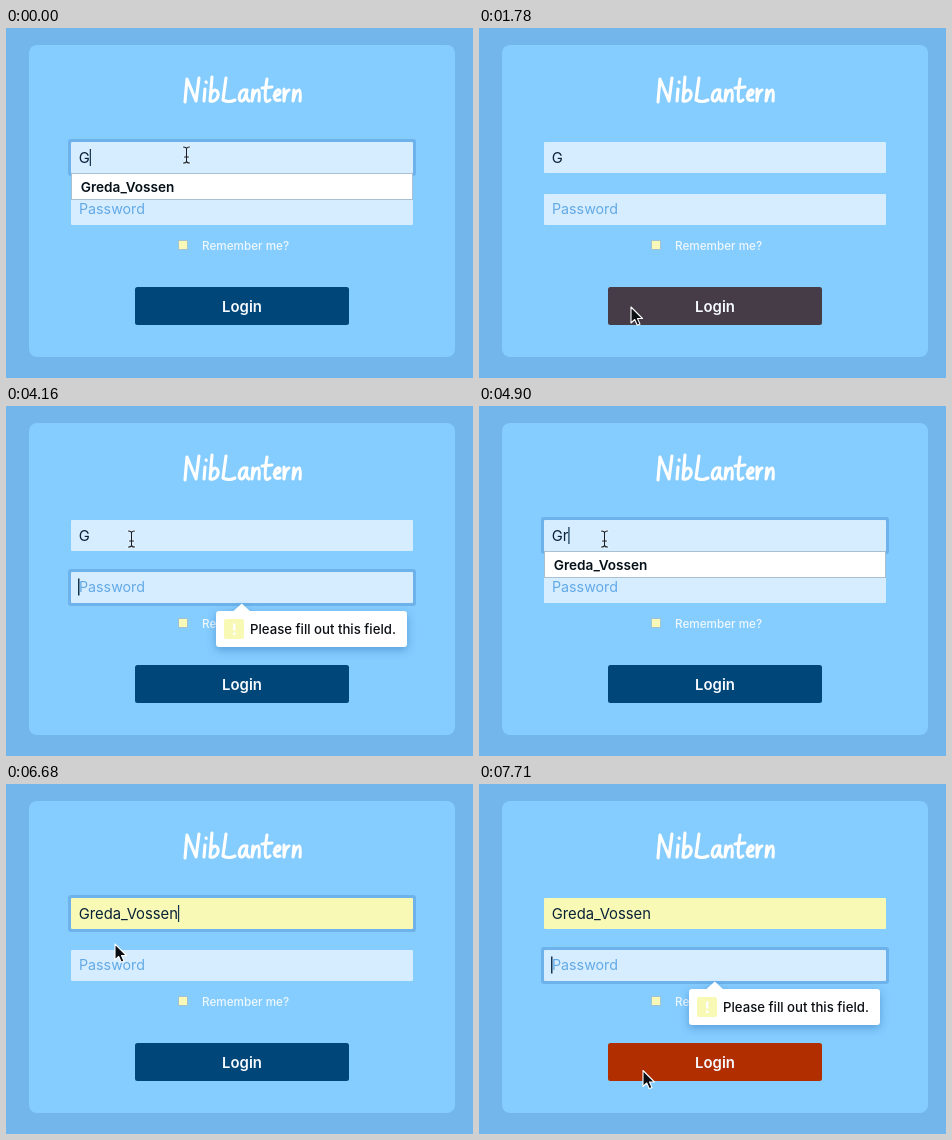
Write an HTML page that moves like this. It is 467x350 px and loops after 8 s.

```html
<!DOCTYPE html>
<html lang="en">
<head>
<meta charset="utf-8">
<title>Login form</title>
<style>
  html, body { margin: 0; width: 100%; height: 100%; overflow: hidden; background: #73b6ec; }
  svg { display: block; width: 100%; height: 100%; }
  text { font-family: Inter, Roboto, sans-serif; white-space: pre; }
  .field { fill: #d6edff; }
  .ring { fill: #6db2ea; }
  .entry { font-size: 14.8px; fill: #0a2238; }
  .hint { font-size: 14.25px; fill: #62a9e6; }
  .caret { fill: #12334f; }
  .tip { filter: drop-shadow(0 3px 4px rgba(20, 90, 160, .4)); }
</style>
</head>
<body>
<svg viewBox="0 0 467 350" preserveAspectRatio="none">
  <rect width="467" height="350" fill="#73b6ec"/>
  <rect x="23" y="17" width="426" height="312" rx="8" fill="#85ccff"/>

  <g role="img" aria-label="NibLantern" fill="none" stroke="#fff" stroke-width="3.1" stroke-linecap="round" stroke-linejoin="round">
    <path d="M179 74L181 51L190 73L193 50"/>
    <path d="M199 61L198 73M200 54L200.3 54.4"/>
    <path d="M206 49L204 73C212 75 215 63 209 62C207 62 205 65 204.5 68"/>
    <path d="M220 50L217 72Q223 75 229 72"/>
    <path d="M240 62C233 60 231 74 236 73C239 72 240 67 241 62Q239 71 243 73"/>
    <path d="M247 62L246 73Q248 62 252 62Q254 63 253 73"/>
    <path d="M261 51Q258 70 260 73Q262 74 264 72M256 60L266 59"/>
    <path d="M268 68Q275 67 274 63Q272 60 269 65Q267 74 274 72"/>
    <path d="M278 61L278 73Q279 63 283 62"/>
    <path d="M288 62L287 73Q290 62 293 62Q295 63 294 73"/>
  </g>

  <rect id="userRing" class="ring" x="62" y="111" width="348" height="37" rx="3"/>
  <rect id="userBox" x="65" y="114" width="342" height="31" rx="1"/>
  <rect id="mark" y="121" height="17" fill="#b0d3ea"/>
  <text id="user" class="entry" x="72.7" y="134.5"></text>
  <rect id="userCaret" class="caret" y="121" width="1.2" height="17"/>

  <rect id="passRing" class="ring" x="62" y="163" width="348" height="37" rx="3"/>
  <rect class="field" x="65" y="166" width="342" height="31" rx="1"/>
  <text class="hint" x="73" y="186">Password</text>
  <rect id="passCaret" class="caret" x="72" y="172.5" width="1.5" height="17"/>

  <rect x="172.5" y="212.5" width="9" height="9" fill="#f8f8b8" stroke="#a3c3d0"/>
  <text x="196" y="221.5" font-size="11.7" font-weight="500" fill="#eef8ff">Remember me?</text>

  <rect id="button" x="129" y="259" width="214" height="38" rx="2.5"/>
  <text x="236" y="284" font-size="14.9" font-weight="600" text-anchor="middle" fill="#f7fbff">Login</text>

  <g id="drop">
    <rect id="dropBox" x="65.5" y="145.5" width="341" height="26" stroke="#a9bfd2"/>
    <text x="74.8" y="164" font-size="13.6" font-weight="600" fill="#061018">Greda_Vossen</text>
  </g>

  <g id="tip" class="tip">
    <path d="M213 205H227.5L235.8 197.5L244 205H398a3 3 0 0 1 3 3V238a3 3 0 0 1-3 3H213a3 3 0 0 1-3-3V208a3 3 0 0 1 3-3Z" fill="#fff"/>
    <rect x="218" y="213" width="20" height="20" rx="2" fill="#f7f9b5"/>
    <path d="M227 217.5h2.5v7h-2.5zM227 226.5h2.5v2.5h-2.5z" fill="#fff"/>
    <text x="244" y="228" font-size="13.2" font-weight="500" fill="#0c0f14">Please fill out this field.</text>
  </g>

  <path id="arrow" d="M0 0V16L3.7 12.5L6.3 18.3L9 17.1L6.5 11.5H11.5Z" fill="#0b0f14" stroke="#fff" stroke-width="1.1" stroke-linejoin="round"/>
  <g id="beam" fill="none" stroke-linecap="round">
    <path d="M-3 -8Q0 -8 0 -6Q0 -8 3 -8M0 -6V6M-3 8Q0 8 0 6Q0 8 3 8M-2 2H2" stroke="#fff" stroke-opacity=".55" stroke-width="2.6"/>
    <path d="M-3 -8Q0 -8 0 -6Q0 -8 3 -8M0 -6V6M-3 8Q0 8 0 6Q0 8 3 8M-2 2H2" stroke="#14202b" stroke-width="1.1"/>
  </g>
</svg>

<script>
const LOOP = 8000;
const NAME = 'Greda_Vossen';
const LEFT = 72.7;
const $ = id => document.getElementById(id);
const arrow = (x, y) => ({ shape: 'arrow', x, y });
const beam = (x, y) => ({ shape: 'beam', x, y });

// Each step keeps the values before it and changes only what it lists.
const steps = [
  [0, { ...beam(180.5, 127), typed: 'G', focus: 'user', caret: 1, drop: 0, open: 1, filled: 0, marked: 0, tip: 0, heat: 0 }],
  [450, { open: 0 }],
  [740, beam(176.5, 139)],
  [890, arrow(169, 156)],
  [1040, beam(162.5, 187)],
  [1190, arrow(157, 217)],
  [1340, { ...arrow(155, 242), focus: '' }],
  [1640, { ...arrow(153, 270), heat: 0.04 }],
  [1780, { ...arrow(152, 279), heat: 0.4 }],
  [1930, { ...arrow(152, 281), heat: 0.85 }],
  [2080, { heat: 1 }],
  [2220, { focus: 'pass', tip: 1 }],
  [2670, { ...arrow(146, 161.5), caret: 0, heat: 0.65 }],
  [2820, { ...beam(137.5, 143), heat: 0.2 }],
  [2970, { ...beam(129.5, 136), heat: 0 }],
  [3120, { ...beam(126.5, 134), caret: 1 }],
  [3270, beam(125.5, 133)],
  [3710, { caret: 0 }],
  [4160, { caret: 1 }],
  [4300, { focus: 'user', tip: 0 }],
  [4750, { typed: 'Gr' }],
  [4900, { open: 1 }],
  [5340, beam(122.5, 136)],
  [5490, beam(118.5, 140)],
  [5640, { ...arrow(113, 147), drop: 1, filled: 1, marked: 1, typed: NAME, caret: 0 }],
  [5790, arrow(110, 152)],
  [5930, arrow(108, 154.5)],
  [6080, arrow(109, 160)],
  [6680, { open: 0, drop: 0, marked: 0, caret: 1 }],
  [6830, arrow(121, 192)],
  [6980, arrow(142, 238)],
  [7120, { ...arrow(156, 272), heat: 0.2 }],
  [7270, { ...arrow(161, 281.5), heat: 0.65 }],
  [7420, { ...arrow(163, 285), heat: 0.95 }],
  [7560, { ...arrow(164, 286.5), heat: 1 }],
  [7710, { focus: 'pass', tip: 1 }]
];

let last = {};
const states = steps.map(([at, change]) => last = { ...last, ...change, at });

const show = (id, on) => $(id).setAttribute('visibility', on ? 'visible' : 'hidden');
const set = (id, name, value) => $(id).setAttribute(name, value);

function heatColor(k) {
  const cold = [0, 70, 120], hot = [176, 46, 0];
  return `rgb(${cold.map((c, i) => Math.round(c + (hot[i] - c) * k))})`;
}

function draw(s) {
  const user = $('user');
  user.textContent = s.typed;
  const end = LEFT + user.getComputedTextLength();

  show('userRing', s.focus === 'user');
  show('passRing', s.focus === 'pass');
  show('userCaret', s.focus === 'user' && s.caret);
  show('passCaret', s.focus === 'pass' && s.caret);
  set('userCaret', 'x', end);
  set('userBox', 'fill', s.filled ? '#f7f9b5' : '#d6edff');

  show('mark', s.marked);
  if (s.marked) {
    const from = LEFT + user.getSubStringLength(0, 2);
    set('mark', 'x', from);
    set('mark', 'width', end - from);
  }

  show('drop', s.open);
  set('dropBox', 'fill', s.drop ? '#b4d6fe' : '#fff');
  show('tip', s.tip);
  set('button', 'fill', heatColor(s.heat));

  for (const id of ['arrow', 'beam']) show(id, s.shape === id);
  set(s.shape, 'transform', `translate(${s.x} ${s.y})`);
}

let shown = null;
function tick() {
  const t = performance.now() % LOOP;
  const state = states.findLast(s => s.at <= t);
  if (state !== shown) draw(shown = state);
  requestAnimationFrame(tick);
}
tick();
</script>
</body>
</html>
```
